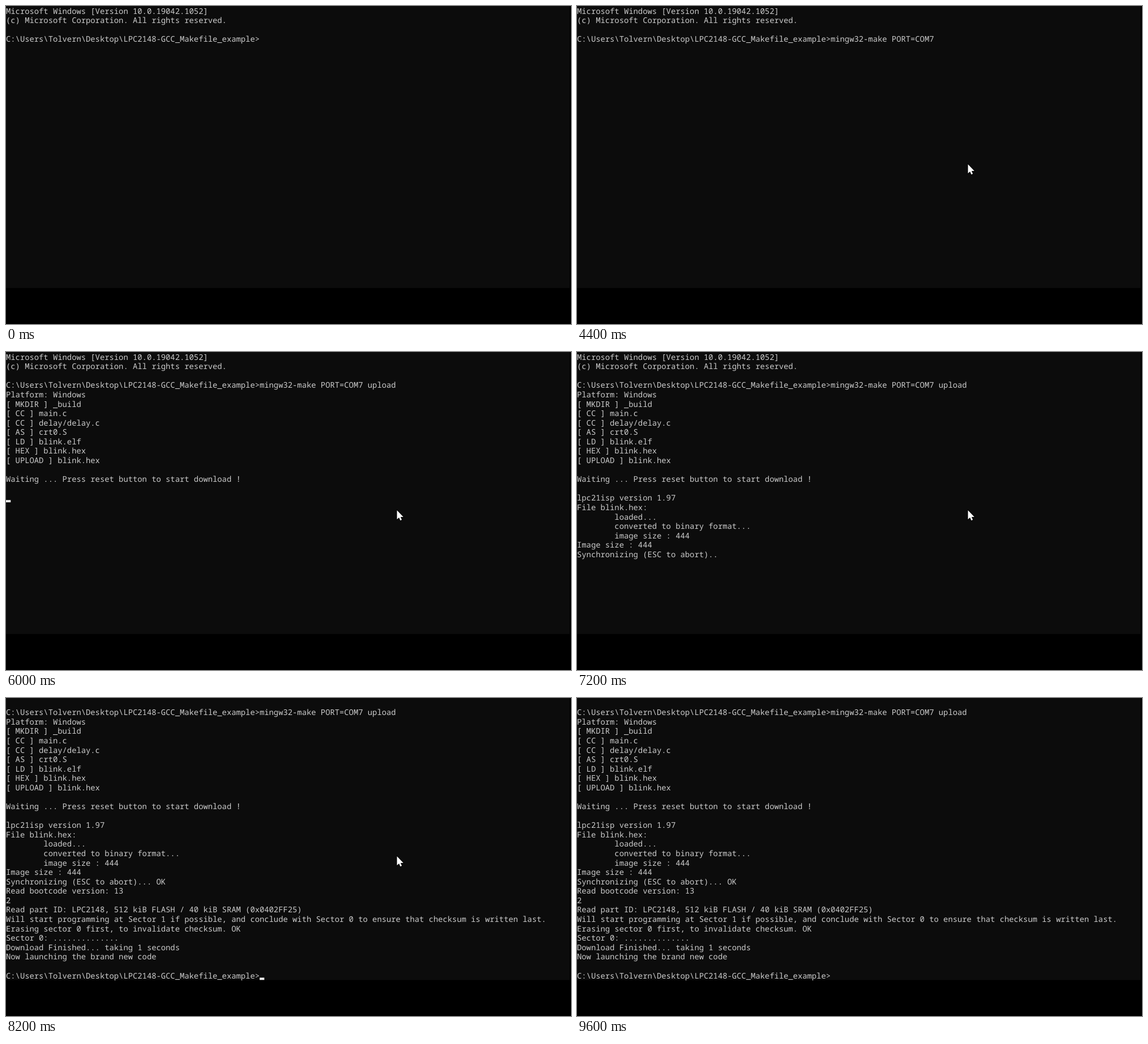
Recreate the animation shown at these times as an HTML page with a canvas. Size 998 by 561 pixels, loop 9800 ms.

```html
<!DOCTYPE html>
<html lang="en">
<head>
<meta charset="utf-8">
<title>Terminal build</title>
<style>
  html, body { margin: 0; width: 100%; height: 100%; overflow: hidden; background: #000; }
  canvas { display: block; }
</style>
</head>
<body>
<canvas id="stage" width="998" height="561"></canvas>
<script>
const ctx = document.getElementById('stage').getContext('2d');
const LOOP = 9800, STEP = 200;
const CELL_W = 8.296, CELL_H = 16.585, COLS = 120, ROWS = 30, BASELINE = 13.6;
const FONT = '13.83px "Noto Sans Mono", "DejaVu Sans Mono", monospace';

const FOCUS = 1200, RUN = 5600, DOTS = 6800, DONE = 8000, BLUR = 8800;
const BLINK = 530;

const PROMPT = 'C:\\Users\\Tolvern\\Desktop\\LPC2148-GCC_Makefile_example>';
const COMMAND = 'mingw32-make PORT=COM7 upload';
const HEADER = `Microsoft Windows [Version 10.0.19042.1052]
(c) Microsoft Corporation. All rights reserved.
`.split('\n');
const BUILD = `Platform: Windows
[ MKDIR ] _build
[ CC ] main.c
[ CC ] delay/delay.c
[ AS ] crt0.S
[ LD ] blink.elf
[ HEX ] blink.hex
[ UPLOAD ] blink.hex

Waiting ... Press reset button to start download !

lpc21isp version 1.97
File blink.hex:
        loaded...
        converted to binary format...
        image size : 444
Image size : 444
Synchronizing (ESC to abort)`.split('\n');
const UPLOAD = `Read bootcode version: 13
2
Read part ID: LPC2148, 512 kiB FLASH / 40 kiB SRAM (0x0402FF25)
Will start programming at Sector 1 if possible, and conclude with Sector 0 to ensure that checksum is written last.
Erasing sector 0 first, to invalidate checksum. OK
Sector 0: ..............
Download Finished... taking 1 seconds
Now launching the brand new code

${PROMPT}`.split('\n');

// Whole units completed at time t when going from a to b between t0 and t1
function count(t, t0, t1, a, b) {
  const progress = Math.min(1, Math.max(0, (t - t0) / (t1 - t0)));
  return Math.floor(a + (b - a) * progress);
}

function screenLines(t) {
  const typed = count(t, FOCUS, 2200, 0, 11) + count(t, 2200, 4400, 0, 11) + count(t, 4400, 5200, 0, 7);
  const lines = [...HEADER, PROMPT + COMMAND.slice(0, typed)];
  if (t < RUN) return lines;

  const built = count(t, RUN, 6400, 4, BUILD.length);
  const uploaded = count(t, 7400, DONE, 0, UPLOAD.length);
  lines.push(...BUILD.slice(0, built));
  if (built < BUILD.length) lines.push('');
  else if (uploaded) lines[lines.length - 1] += '... OK';
  else if (t >= DOTS) lines[lines.length - 1] += '..';

  lines.push(...UPLOAD.slice(0, uploaded));
  if (uploaded && uploaded < UPLOAD.length) lines.push('');
  return lines.slice(-ROWS);
}

// The blink restarts when the command runs and when the prompt returns
function cursorOn(t) {
  if (t < FOCUS || t >= BLUR) return false;
  const start = t >= DONE ? DONE : t >= RUN ? RUN : 680;
  return (t - start) % (2 * BLINK) < BLINK;
}

function drawLine(text, row) {
  [...text].forEach((char, col) => {
    if (char !== ' ') ctx.fillText(char, col * CELL_W, BASELINE + row * CELL_H);
  });
}

function drawCursor(lines) {
  const row = lines.length - 1;
  ctx.fillStyle = '#f2f2f2';
  ctx.fillRect(lines[row].length * CELL_W, (row + 1) * CELL_H - 4.2, CELL_W, 4);
}

function drawMouse(t) {
  const away = Math.max(0, (FOCUS - t) / 600, (t - 8600) / 1000);
  if (away >= 1) return;
  ctx.save();
  ctx.translate(690.6 + 310 * away, 279.2 + 120 * away);
  ctx.beginPath();
  [[0, 0], [0, 16], [3.6, 12.8], [5.9, 18], [8.6, 16.9], [6.3, 11.8], [11.3, 11.8]]
    .forEach(([x, y]) => ctx.lineTo(x, y));
  ctx.closePath();
  ctx.lineWidth = 1.6;
  ctx.strokeStyle = '#000';
  ctx.stroke();
  ctx.fillStyle = '#fff';
  ctx.fill();
  ctx.restore();
}

function draw(now) {
  const t = Math.floor(now % LOOP / STEP) * STEP;
  const lines = screenLines(t);
  ctx.fillStyle = '#000';
  ctx.fillRect(0, 0, 998, 561);
  ctx.fillStyle = '#0c0c0c';
  ctx.fillRect(0, 0, COLS * CELL_W, ROWS * CELL_H);

  ctx.font = FONT;
  ctx.textRendering = 'geometricPrecision';
  ctx.fillStyle = '#ccc';
  lines.forEach(drawLine);
  if (cursorOn(t)) drawCursor(lines);
  drawMouse(t);
}

function loop() {
  draw(performance.now());
  requestAnimationFrame(loop);
}
loop();
</script>
</body>
</html>
```
